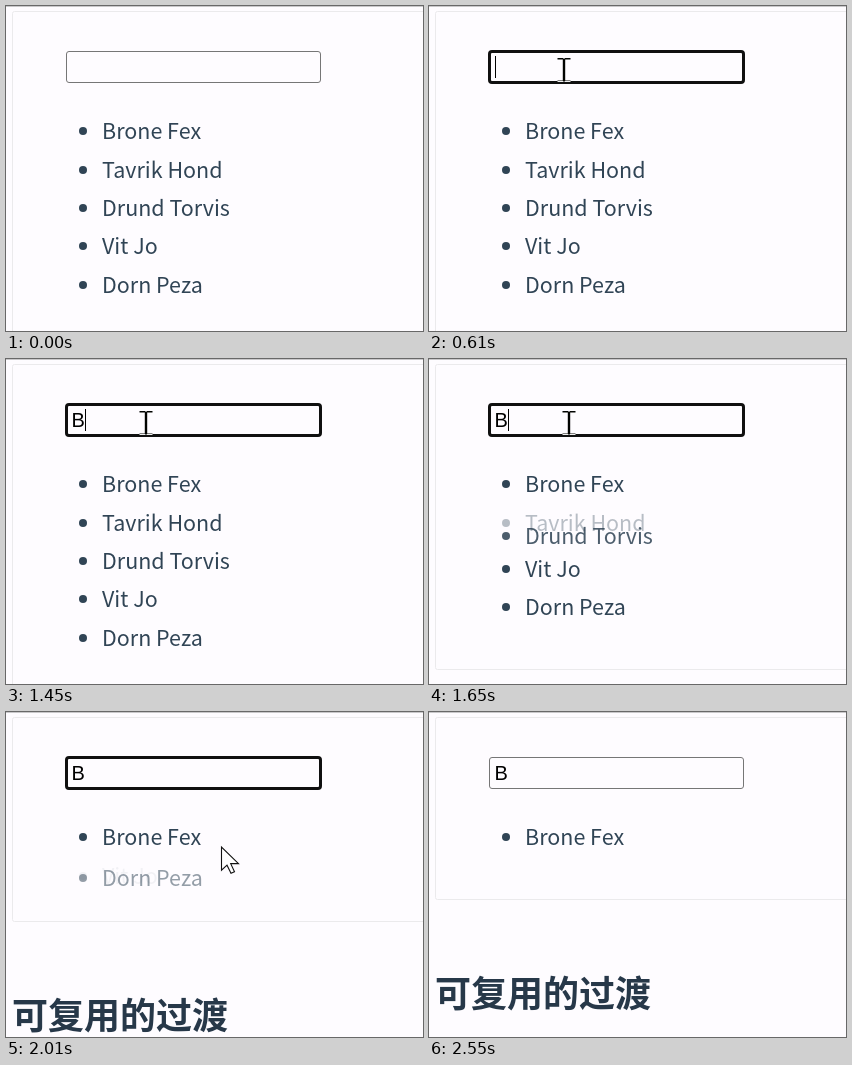
Animation, 417 px wide and 325 px high, one loop 2610 ms. Source, as an HTML page:

```html
<!DOCTYPE html>
<html lang="zh">
<head>
<meta charset="utf-8">
<style>
  html, body { margin: 0; width: 100%; height: 100%; overflow: hidden; background: #fefcff; }
  svg { display: block; }
  text { font-family: "Noto Sans CJK SC", "Noto Sans CJK", "Noto Sans CJK JP", sans-serif; }
  .item { font-size: 21.5px; fill: #304455; }
  #heading { font-size: 36px; font-weight: 700; fill: #273849; }
  #typed { font: 20px "Liberation Sans", sans-serif; }
  #beam { mix-blend-mode: difference; fill: #fff; }
</style>
</head>
<body>
<svg id="stage" width="417" height="325" viewBox="0 0 417 325">
  <rect width="417" height="325" fill="#fefcff"/>
  <rect width="417" height="1" fill="#c9c8ca"/>
  <rect id="card" x="6.5" y="5.5" width="430" rx="2" fill="none" stroke="#ebeaec"/>
  <g id="list"></g>
  <text id="heading" x="6" y="0">可复用的过渡</text>
  <rect id="field" x="60.5" y="45.5" width="254" height="31" rx="2.5" fill="none"/>
  <text id="typed" x="65.5" y="68">B</text>
  <rect id="caret" y="50" width="1" height="22"/>
  <path id="beam" d="M-6.5-12H-1L0-11 1-12H6.5V-10.4H1.2V10.4H6.5V12H1L0 11-1 12H-6.5V10.4H-1.2V-10.4H-6.5Z"/>
  <path id="arrow" d="M.5.5V23.5L6 18.5 10 26.5 13.5 25 9.7 17H17.5Z" fill="#fff" stroke="#111" stroke-width="1.1"/>
</svg>
<script>
const LOOP = 2610, ROW = 38.4;
const FOCUS = 550, TYPE = 1330, BLUR = 2550;
const LEAVE_START = 1425, LEAVE_TIME = 372, STAGGER = 134;
const names = ["Brone Fex", "Tavrik Hond", "Drund Torvis", "Vit Jo", "Dorn Peza"];
const el = id => document.getElementById(id);
const clamp = v => Math.min(1, Math.max(0, v));
const mix = (a, b, u) => a + (b - a) * u;
const swing = u => 0.5 - Math.cos(Math.PI * u) / 2;
const show = (node, on) => { node.style.display = on ? "" : "none"; };
const within = (t, from, to) => t >= from && t < to;

el("list").innerHTML = names.map(name =>
  `<g class="item"><circle cx="77" cy="125" r="4"/><text x="96" y="133">${name}</text></g>`).join("");
const items = [...el("list").children];

// The screen refreshes every 60 ms, counted anew after each pause.
function refreshTime(t) {
  const base = t < FOCUS ? 0 : t < 1410 ? FOCUS : 1410;
  return base + Math.floor((t - base) / 60) * 60;
}

function pointer(t) {
  if (t < 60 || t >= 2190) return null;
  if (t < FOCUS) {
    const u = 1 - (1 - clamp((t - 60) / 360)) ** 2;
    return [mix(352, 135, u), mix(298, 64, u)];
  }
  if (t < 1950) return [mix(130, 140, clamp((t - FOCUS) / 120)), 64];
  const u = (t - 1950) / 180;
  return [mix(140, 365, u), mix(64, 276, u)];
}

function drawList(t) {
  let offset = 0;
  items.forEach((item, i) => {
    const u = i ? clamp((t - LEAVE_START - (i - 1) * STAGGER) / LEAVE_TIME) : 0;
    const left = 1 - swing(u);
    item.setAttribute("transform", `translate(0 ${Math.round(offset + 0.2)})`);
    item.setAttribute("opacity", left);
    offset += ROW * left;
  });
  const bottom = Math.round(149 + offset) + 0.5;
  el("card").setAttribute("height", bottom - 5.5);
  el("heading").setAttribute("y", bottom + 107);
}

function drawField(t, hovered) {
  const focused = within(t, FOCUS, BLUR);
  const field = el("field");
  field.setAttribute("stroke", focused ? "#101010" : hovered ? "#4f4f4f" : "#767676");
  field.setAttribute("stroke-width", focused ? 3 : 1);
  show(el("typed"), t >= TYPE);
  show(el("caret"), within(t, FOCUS, 1030) || within(t, TYPE, 1830));
  el("caret").setAttribute("x", t < TYPE ? 66 : 79);
}

function draw(t) {
  const at = pointer(t);
  const hovered = !!at && at[0] > 60 && at[0] < 315 && at[1] > 45 && at[1] < 77;
  drawList(t);
  drawField(t, hovered);
  show(el("beam"), hovered);
  show(el("arrow"), at && !hovered);
  if (at) el(hovered ? "beam" : "arrow").setAttribute("transform", `translate(${at})`);
}

function tick() {
  draw(refreshTime(performance.now() % LOOP));
  requestAnimationFrame(tick);
}
tick();
</script>
</body>
</html>
```
